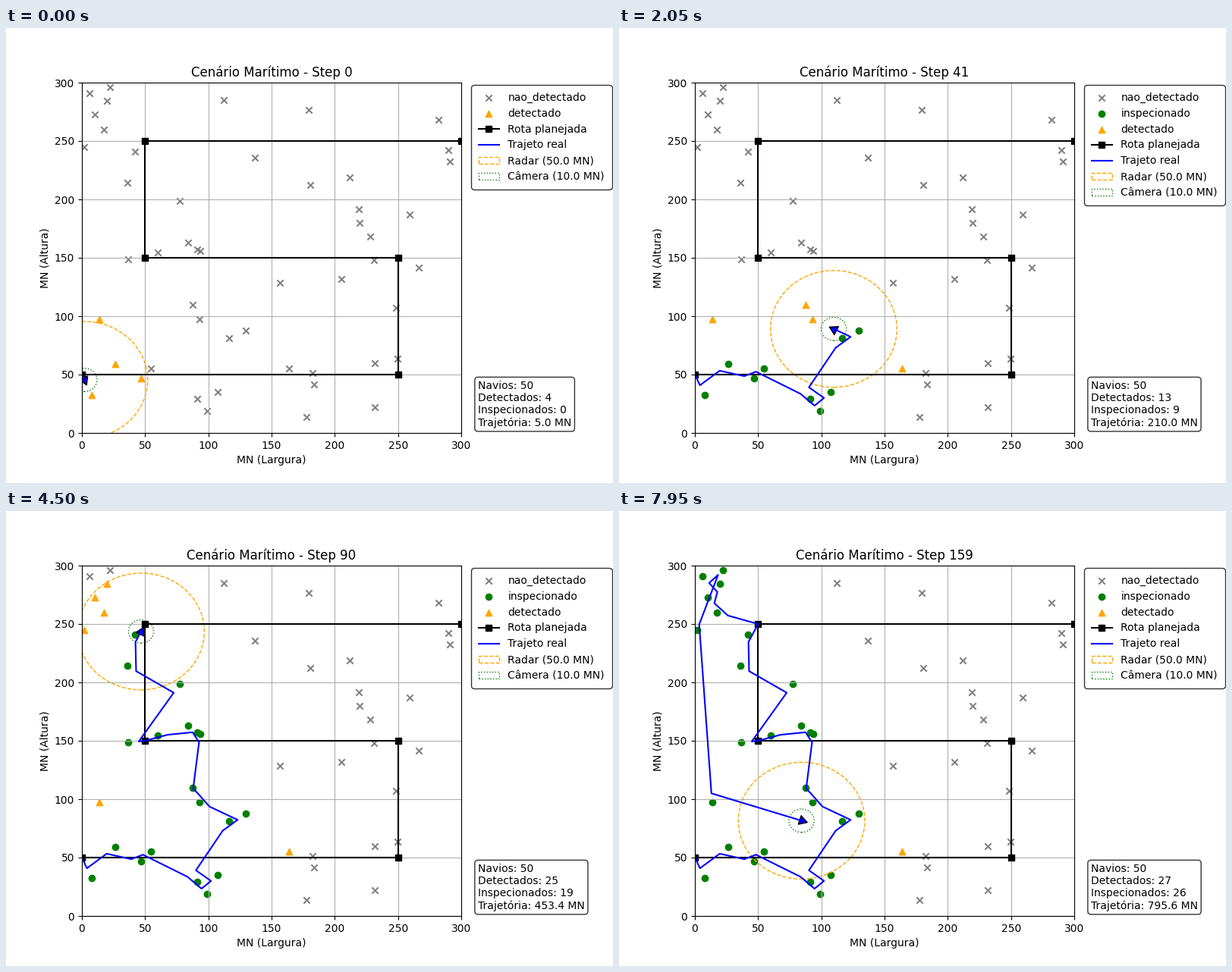
A matplotlib script that plays this animation: 800 by 600 pixels, repeating every 8000 ms.

```python
import numpy as np
import matplotlib.pyplot as plt
from matplotlib.animation import FuncAnimation

SIZE, STEPS, SPEED = 300, 160, 5.0
RADAR, CAMERA = 50.0, 10.0
HIDDEN, DETECTED, INSPECTED = range(3)

ROUTE = np.array([(0, 50), (250, 50), (250, 150), (50, 150), (50, 250), (300, 250)], float)

np.random.seed(42)
ships = np.random.uniform(0, SIZE, (50, 2))


def distance(points, pos):
    return np.hypot(*(points - pos).T)


def simulate():
    """Always head for the nearest open waypoint or detected ship."""
    pos = ROUTE[0].copy()
    state = np.full(len(ships), HIDDEN)
    visited = np.zeros(len(ROUTE), bool)
    visited[0] = True
    path, states, angles, totals = [pos], [], [], []
    total = 0.0

    def scan():
        d = distance(ships, pos)
        state[(d <= RADAR) & (state == HIDDEN)] = DETECTED
        return d

    scan()
    for _ in range(STEPS):
        goals = np.vstack([ROUTE[~visited], ships[state == DETECTED]])
        gaps = distance(goals, pos)
        near = gaps.argmin()
        move = min(SPEED, gaps[near])
        heading = (goals[near] - pos) / gaps[near]
        pos = pos + heading * move
        total += move
        visited |= distance(ROUTE, pos) < 1e-6
        state[scan() <= CAMERA] = INSPECTED
        path.append(pos)
        states.append(state.copy())
        angles.append(np.degrees(np.arctan2(heading[1], heading[0])))
        totals.append(total)
    return np.array(path), states, angles, totals


path, states, angles, totals = simulate()

fig, ax = plt.subplots(figsize=(8, 6), dpi=100)
fig.subplots_adjust(left=0.125, right=0.75, bottom=0.11, top=0.88)
ax.set(xlim=(0, SIZE), ylim=(0, SIZE), xlabel="MN (Largura)", ylabel="MN (Altura)")
ax.grid(True)
title = ax.set_title("")

groups = [
    (HIDDEN, ax.scatter([], [], c="gray", marker="x", label="nao_detectado")),
    (INSPECTED, ax.scatter([], [], c="green", marker="o", label="inspecionado")),
    (DETECTED, ax.scatter([], [], c="orange", marker="^", label="detectado")),
]
plan, = ax.plot(*ROUTE.T, "ks-", label="Rota planejada")
track, = ax.plot([], [], "b-", label="Trajeto real")


def ring(radius, color, style, name):
    return ax.add_patch(plt.Circle((0, 0), radius, color=color, fill=False,
                                   linestyle=style, label=f"{name} ({radius} MN)"))


radar = ring(RADAR, "orange", "--", "Radar")
camera = ring(CAMERA, "green", ":", "Câmera")
info = ax.text(1.044, 0.02, "", transform=ax.transAxes,
               bbox=dict(boxstyle="round", facecolor="white", alpha=0.8))
boat = None


def draw(step):
    global boat
    pos, state = path[step + 1], states[step]
    title.set_text(f"Cenário Marítimo - Step {step}")

    shown = []
    for kind, dots in groups:
        mask = state == kind
        dots.set_offsets(ships[mask])
        if mask.any():
            shown.append(dots)

    track.set_data(*path[:step + 2].T)
    radar.center = camera.center = tuple(pos)
    if boat is not None:
        boat.remove()
    boat = ax.scatter(*pos, s=100, marker=(3, 0, angles[step] - 90),
                      c="blue", edgecolors="black")

    legend = ax.legend(handles=shown + [plan, track, radar, camera], loc="upper left",
                       bbox_to_anchor=(1.02, 1), framealpha=0.8, edgecolor="black")
    legend.get_frame().set_boxstyle("round")

    info.set_text(f"Navios: {len(ships)}\n"
                  f"Detectados: {(state != HIDDEN).sum()}\n"
                  f"Inspecionados: {(state == INSPECTED).sum()}\n"
                  f"Trajetória: {totals[step]:.1f} MN")
    return []


anim = FuncAnimation(fig, draw, frames=STEPS, init_func=lambda: [], interval=50,
                     repeat=True, repeat_delay=0)
plt.show()
```
